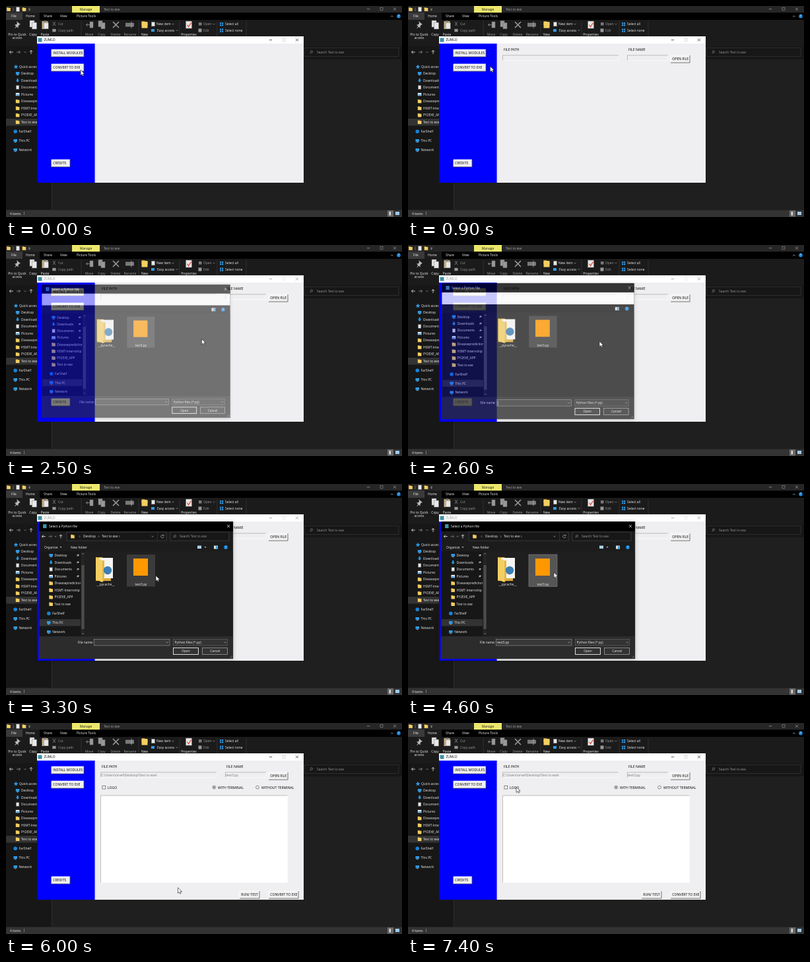
Animation, 600 px wide and 320 px high, one loop 8000 ms. Source, as an HTML page:

```html
<!DOCTYPE html>
<html lang="en">
<head>
<meta charset="utf-8">
<title>Convert a script</title>
<style>
html, body { margin: 0; width: 100%; height: 100%; overflow: hidden; background: #191919; }
svg { display: block; width: 600px; height: 320px; }
text { font: 4.9px "Open Sans", "Noto Sans", sans-serif; white-space: pre; }
.tk { font-size: 5.15px; }
#dialog { transform-origin: 197px 161px; filter: drop-shadow(0 1px 3px rgba(0,0,0,.2)); }
</style>
</head>
<body>
<svg id="stage" viewBox="0 0 600 320"></svg>
<script>
const DURATION = 8000, STEP = 100;
const YELLOW = '#f3cf62', BLUE = '#2f9be6', GREY = '#999', PALE = '#f0f0f0';

const rect = (x, y, w, h, fill, stroke = 'none', sw = .6) =>
  `<rect x="${x}" y="${y}" width="${w}" height="${h}" fill="${fill}" stroke="${stroke}" stroke-width="${sw}"/>`;
const text = (x, y, s, fill = PALE, anchor = 'start', cls = '') =>
  `<text x="${x}" y="${y}" fill="${fill}" text-anchor="${anchor}" class="${cls}">${s}</text>`;
const mid = (x, y, s, fill) => text(x, y, s, fill, 'middle');
const tk = (x, y, s, fill = '#000') => text(x, y, s, fill, 'start', 'tk');
const line = (d, stroke = PALE, sw = .7) =>
  `<path d="${d}" fill="none" stroke="${stroke}" stroke-width="${sw}"/>`;
const shape = (d, fill) => `<path d="${d}" fill="${fill}"/>`;
const circle = (x, y, r, fill, stroke = 'none') =>
  `<circle cx="${x}" cy="${y}" r="${r}" fill="${fill}" stroke="${stroke}" stroke-width=".6"/>`;
const group = (id, body) => `<g id="${id}">${body}</g>`;

const folder = (x, y, w = 5.6) =>
  rect(x - w / 2, y - 2.8, w * .55, 2, '#d9a93a') + rect(x - w / 2, y - 2, w, 4.8, YELLOW);
const page = (x, y, w = 5, h = 6.5, fill = '#e8e8e8') =>
  rect(x - w / 2, y - h / 2, w, h, fill, '#777', .5);
const chevron = (x, y, c = '#aaa') => line(`M${x - 1.5} ${y - .8}l1.5 1.5 1.5 -1.5`, c);
const next = (x, y) => line(`M${x - .7} ${y - 1.4}l1.4 1.4 -1.4 1.4`, '#bbb', .6);
const arrow = (x, y, turn, c = PALE) =>
  `<g transform="translate(${x} ${y}) rotate(${turn})">${line('M2.8 0H-2.6M-.4 -2.2L-2.6 0L-.4 2.2', c, .8)}</g>`;
const lens = (x, y) => circle(x, y - .6, 1.6, 'none', '#999') + line(`M${x - 1.2} ${y + .7}l-1.3 1.4`, '#999');
const help = (x, y) => circle(x, y, 2.9, '#1583d8') + mid(x, y + 1.7, '?', '#fff');

function windowButtons(x, y, c, box = c) {
  return line(`M${x - 2.2} ${y}h4.4`, c) + rect(x + 18, y - 2, 4, 4, 'none', box, .5) +
    line(`M${x + 38} ${y - 2}l4 4m0 -4l-4 4`, c);
}

const places = [['Desktop', 'screen'], ['Downloads', 'down'], ['Documents', 'page'], ['Pictures', 'picture'],
  ['Diseaseprediction', 'folder'], ['HSMT-Internship', 'folder'], ['PY2EXE_APP', 'folder'], ['Test to exe', 'folder']];
const roots = [['FarShelf', 'dot'], ['This PC', 'screen'], ['Network', 'screen']];
const icons = {
  screen: (x, y) => rect(x - 2.8, y - 2.3, 5.6, 3.8, BLUE) + rect(x - 1.5, y + 2, 3, .8, '#9ccff5'),
  down: (x, y) => shape(`M${x - 1.1} ${y - 2.8}h2.2v2.6h1.7l-2.8 3 -2.8 -3h1.7z`, BLUE),
  page: (x, y) => page(x, y, 4.4, 5.4),
  picture: (x, y) => rect(x - 2.8, y - 2.1, 5.6, 4.4, '#e8f2f8') + rect(x - 2.2, y, 4.4, 1.7, BLUE),
  folder: (x, y) => folder(x, y),
  dot: (x, y) => circle(x, y, 2.8, '#1683d8')
};

// Navigation list shared by the file manager and the open dialog.
function navList(x, y) {
  const row = ([name, icon], px, py) => icons[icon](px, py) + text(px + 5.4, py + 1.8, name);
  return places.map((p, i) => row(p, x, y + i * 10.55)).join('') +
    roots.map((p, i) => row(p, x - 3.4, y + 88 + i * 14)).join('');
}

function fileManager() {
  const big = (x, label, icon, c = PALE) => icon + mid(x, 44.5, label, c);
  const split = x => line(`M${x} 23V46`, '#444', .5);
  return rect(0, 0, 600, 320, '#1f1f1f') + rect(0, 0, 600, 10, '#272627') + rect(0, 10, 600, 11, '#000') +
    rect(0, 10, 25, 11, '#3a3a3a') + rect(25, 10, 26, 11, '#1b1b1b') + rect(0, 21, 600, 40, '#1b1b1b') +
    rect(0, 61, 600, 20, '#171717') +
    folder(4, 5) + line('M11 2.5v5.5', '#aaa', .5) + page(18, 5) + folder(27.5, 5) + line('M34 4h3', '#ccc', .5) +
    shape('M34 5.5h3l-1.5 1.6z', '#ccc') +
    rect(100, 0, 42, 10, '#ece76c') + mid(121, 6.8, 'Manage', '#222') + text(148, 6.8, 'Test to exe', '#aaa') +
    windowButtons(549, 4.7, '#aaa') +
    [[8, 'File'], [30, 'Home'], [57, 'Share'], [82, 'View'], [107, 'Picture Tools']].map(([x, s]) => text(x, 17.4, s)).join('') +
    line('M583 16.5l1.8 -1.7 1.8 1.7', '#ccc') + help(595, 15.5) +
    big(17, 'Pin to Quick', shape('M16 23l6 5 -2 .5 -1.5 2 0 3 -2.2 -2 -3.3 3 2.2 -4 -2.2 -2 3 -.5 1 -2z', '#bbb')) + mid(17, 50.3, 'access') +
    big(41, 'Copy', page(39.5, 27, 7, 10) + page(43, 30, 7, 10)) +
    big(59, 'Paste', rect(54.5, 23, 9, 12, '#c9b083') + rect(57, 22.3, 4, 2, '#777') + page(60.7, 30, 7, 9.5)) +
    line('M71 24l4 6m0 -6l-4 6', GREY) + text(79, 29.3, 'Cut', GREY) + page(73, 37, 5, 4, GREY) + text(79, 38.8, 'Copy path', GREY) +
    split(114) + big(126, 'Move', arrow(124, 28.5, 0, GREY) + page(129.5, 28.5, 5, 9, GREY), GREY) +
    big(145, 'Copy', page(143, 27, 6, 9, GREY) + page(147, 30, 6, 9, GREY), GREY) +
    big(166, 'Delete', line('M162 24l9 9m0 -9l-9 9', GREY, 1.6), GREY) +
    big(188, 'Rename', rect(181.5, 26, 12, 5, '#777', GREY) + line('M190 23.5v10', '#bbb'), GREY) + split(201) +
    big(210, 'New', folder(210, 26, 9) + rect(205.5, 26, 9, 7.5, YELLOW)) +
    page(223, 27.5) + text(228, 29.3, 'New item') + chevron(253, 27.5) +
    rect(220, 35, 5, 4, BLUE) + text(229, 38.8, 'Easy access') + chevron(259, 37) + split(263) +
    big(277, 'Properties', page(277, 28.5, 9, 11) + line('M274.5 28.5l2 3 4 -6', '#e54b32', 1.3)) +
    rect(292, 25, 4.5, 4.5, '#777') + text(299, 29.3, 'Open', GREY) + chevron(315, 27.5, GREY) +
    page(294, 37, 4.5, 5, GREY) + text(299, 38.8, 'Edit', GREY) + split(320) +
    [27.5, 37].map(y => rect(324, y - 2.5, 2.2, 2.2, BLUE) + rect(327, y - 2.5, 2.2, 2.2, BLUE) +
      rect(324, y + .5, 2.2, 2.2, BLUE) + rect(327, y + .5, 2.2, 2.2, BLUE)).join('') +
    text(332, 29.3, 'Select all') + text(332, 38.8, 'Select none') + split(364) +
    arrow(8, 70, 0) + arrow(19, 70, 180, GREY) + chevron(29, 70) + arrow(38, 70, 90) +
    rect(452, 63.5, 143, 13, '#171717', '#444', .5) + lens(463, 70) + text(471, 71.8, 'Search Test to exe', GREY) +
    rect(0, 81, 69, 228, '#171717') + line('M69.3 81V309', '#3a3a3a', .6) + rect(0, 171, 69, 10.5, '#333') +
    shape('M15 88.5l1 2.4 2.4 .2 -1.8 1.6 .6 2.5 -2.2 -1.4 -2.2 1.4 .6 -2.5 -1.8 -1.6 2.4 -.2z', BLUE) +
    text(20, 93.8, 'Quick access') + navList(17.6, 102.3) +
    rect(0, 309.5, 600, 10.5, '#333') + text(6, 316.7, '4 items') + line('M27.5 312v5', '#bbb', .5) +
    rect(578, 310, 9, 9.5, '#6a6a6a') + rect(580.8, 312, 2, 5.5, '#eee') + rect(590, 312, 6, 5, '#9cc9e8');
}

function button(id, x, y, w, label) {
  return group(id, rect(x, y, w, 11, '#f0f0f0') + line(`M${x} ${y + 11}V${y}H${x + w}`, '#fff', .8) +
    line(`M${x} ${y + 11}H${x + w}V${y}`, '#555', .8) + tk(x + 2.3, y + 7.2, label));
}

const sunken = (x, y, w, h, fill) => rect(x, y, w, h, fill) +
  line(`M${x} ${y + h}V${y}H${x + w}`, '#999', .6) + line(`M${x} ${y + h}H${x + w}V${y}`, '#fff', .6);

function appWindow() {
  const radio = (x, on) => circle(x, 97.5, 2.4, '#fff', '#333') + (on ? circle(x, 97.5, 1.1, '#222') : '');
  return rect(47, 46, 404, 222, '#efeef0') + rect(47, 46, 404, 11, '#fff') +
    rect(48.5, 48.5, 6, 6, '#3f91a5') + `<text id="title" x="57.5" y="53.4">ZUMLO</text>` +
    group('controls', windowButtons(401, 51.5, '#222', '#bbb')) +
    rect(47, 57, 87.6, 211, '#00f') +
    button('install', 69, 66, 49, 'INSTALL MODULES') + button('convert', 69, 88, 49, 'CONVERT TO EXE') +
    button('credits', 69, 233, 28, 'CREDITS') +
    group('fileForm', tk(145, 68.2, 'FILE PATH') + tk(334, 68.2, 'FILE NAME') +
      sunken(143.5, 74.8, 175.5, 8, '#efeef0') + sunken(332.5, 74.8, 61.5, 8, '#efeef0') + button('openFile', 398, 75, 29, 'OPEN FILE')) +
    group('options', tk(144, 80.7, 'C:\\Users\\orvel\\Desktop\\Test to exe\\', '#777') + tk(333, 80.7, 'test3.py', '#777') +
      rect(146, 95.2, 4.8, 4.8, '#fff', '#333') + tk(154, 99.7, 'LOGO') +
      radio(315.3, true) + tk(321, 99.7, 'WITH TERMINAL') + radio(381, false) + tk(387, 99.7, 'WITHOUT TERMINAL') +
      sunken(143.5, 110, 283, 132, '#fff') + button('run', 354, 255, 30, 'RUN/ TEST') + button('build', 398, 255, 45, 'CONVERT TO EXE'));
}

function dialog() {
  const pin = y => shape(`M109 ${y - 2}l2.3 1.8 -1.3 .3 -.3 1.3 -1.2 -1 -1.6 1.8 1 -2.2 -.8 -.8 1.5 -.2z`, '#bbb');
  return rect(50, 57, 294, 208, '#1c1c1c', '#555', .4) + rect(50, 57, 294, 14.5, '#000') +
    rect(56, 61, 5.5, 6, '#3f91a5') + text(65, 66, 'Select a Python file', '#fff') + line('M335 62l4 4m0 -4l-4 4', '#eee') +
    group('loading', rect(50, 71, 294, 18.3, '#fff')) +
    group('loaded', arrow(57, 79.5, 0) + arrow(67, 79.5, 180, '#777') + chevron(75, 79.5) + arrow(83, 79.5, 90) +
      rect(92, 73, 151, 13, '#171717', '#555', .5) + folder(101, 79.5) + next(111.5, 79.5) + text(117, 81.3, 'Desktop') +
      next(140.5, 79.5) + text(145, 81.3, 'Test to exe') + next(171.5, 79.5) + chevron(222, 79.5) + line('M229.5 73v13', '#444', .5) +
      line('M238.4 78a2.2 2.2 0 1 0 .6 2M239 76.5v2h-2', '#bbb', .6) +
      rect(249, 73, 89, 13, '#171717', '#555', .5) + lens(256, 79.5) + text(263, 81.3, 'Search Test to exe', GREY) +
      text(58, 97.8, 'Organize') + shape('M81.5 95h3l-1.5 1.7z', '#ccc') + text(98, 97.8, 'New folder') +
      rect(290, 93.5, 6, 4.5, '#a9d2ec') + shape('M300.5 95h3l-1.5 1.7z', '#ccc')) +
    rect(315, 93.5, 6, 5, '#ddd') + rect(318, 94.3, 2.5, 3.7, BLUE) + help(333, 96) +
    rect(50.3, 102, 69.7, 129, '#171717') + rect(120, 102, 223.7, 129, '#1f1f1f') + rect(51, 205, 62, 10.5, '#333') +
    `<g clip-path="url(#navClip)">${navList(68.2, 108.3)}</g>` + [108.3, 118.9, 129.4, 140].map(pin).join('') +
    rect(113.5, 103, 6, 127, '#242424') + rect(114.3, 123, 4.4, 97, '#4b4b4b') + chevron(116.5, 227) +
    line('M115 106.5l1.5 -1.5 1.5 1.5', '#aaa') +
    shape('M136 111h10l3 3h10v33h-23z', '#d9a93a') + shape('M141 112h21v31h-21z', '#f5f5f2') +
    shape('M136 111l10 5v33l-10 -4z', YELLOW) + shape('M146 116h3v30l-3 3z', '#e3b84a') + circle(154, 131, 6.2, '#3d7eb2') +
    mid(151, 154, '__pycache__') +
    `<rect id="tile" x="183" y="107" width="43" height="48.5" stroke-width=".6"/>` +
    rect(193, 113, 22, 26, '#ff9800') + mid(204.5, 154, 'test3.py') +
    rect(50.3, 231, 293.4, 33.7, '#2c2c2c') + text(132, 242.2, 'File name:', PALE, 'end') +
    rect(133.5, 235.5, 114.5, 9.5, '#383838', '#aaa', .5) + chevron(244, 240.3) +
    rect(253.5, 235.5, 82, 9.5, '#333', '#777', .5) + text(255.5, 242.2, 'Python files (*.py)') + chevron(332, 240.3) +
    group('highlight', rect(134.7, 236.6, 20, 7.2, '#0078d7')) + group('fileName', text(135, 242.2, 'test3.py', '#fff')) +
    group('caret', line('M135.6 237v7', '#fff', .6)) +
    `<rect id="openButton" x="253.5" y="248.5" width="38" height="10" stroke="#eee" stroke-width=".9"/>` + mid(272.5, 255.4, 'Open') +
    rect(297.5, 248.5, 38, 10, '#333', '#aaa', .7) + mid(316.7, 255.4, 'Cancel') +
    line('M339 264l4 -4m-2 4l2 -2', '#888', .6);
}

const stage = document.getElementById('stage');
stage.innerHTML = '<clipPath id="navClip"><rect x="50" y="103" width="63.3" height="128"/></clipPath>' +
  fileManager() + appWindow() + group('dialog', dialog()) +
  '<path id="cursor" d="M0 0V8.4L2 6.6L3.3 9.3L4.8 8.6L3.5 6H6.2Z" fill="#fff" stroke="#111" stroke-width=".6"/>';
const el = Object.fromEntries([...stage.querySelectorAll('[id]')].map(e => [e.id, e]));

// time, x, y
const pointer = [[0, 113, 97], [400, 108, 92], [800, 108, 92], [1500, 405, 83], [1900, 405, 83], [2600, 290, 146],
  [3300, 227, 139], [3700, 221, 134], [4600, 221, 134], [5100, 263, 255], [5900, 263, 255], [6800, 187, 101],
  [6900, 187, 101], [7400, 164, 97], [DURATION, 164, 97]];
// time, opacity, scale
const fade = [[0, 0, .95], [2400, .3, .95], [2500, .6, .97], [2600, .78, .99], [2700, 1, 1],
  [5400, .55, .98], [5500, .17, .96], [5600, 0, .95]];

function pointerAt(t) {
  const i = pointer.findIndex(k => k[0] > t);
  const [t0, x0, y0] = pointer[i - 1], [t1, x1, y1] = pointer[i];
  const p = (t - t0) / (t1 - t0), e = p * p * (3 - 2 * p);
  return [x0 + (x1 - x0) * e, y0 + (y1 - y0) * e];
}

const show = (id, on) => { el[id].style.display = on ? '' : 'none'; };

function draw(t) {
  const within = (a, b) => t >= a && t < b;
  const press = (id, on) => el[id].setAttribute('transform', on ? 'translate(.5 .5)' : '');
  const [x, y] = pointerAt(t);
  el.cursor.setAttribute('transform', `translate(${x} ${y})`);

  const inactive = within(2300, 5500);
  el.title.setAttribute('fill', inactive ? '#999' : '#000');
  el.controls.setAttribute('opacity', inactive ? .5 : 1);
  press('convert', within(700, 900));
  press('openFile', within(1700, 1900));
  show('fileForm', t >= 900);
  show('options', t >= 5700);

  const [, opacity, scale] = fade.filter(k => k[0] <= t).pop();
  show('dialog', opacity > 0);
  el.dialog.style.opacity = opacity;
  el.dialog.style.transform = `scale(${scale})`;
  show('loading', t < 2700);
  show('loaded', t >= 2700);

  const chosen = t >= 4400;
  el.tile.setAttribute('fill', chosen ? '#555' : '#3b3b3b');
  el.tile.setAttribute('stroke', chosen ? '#888' : 'none');
  show('fileName', chosen);
  show('highlight', t >= 5100);
  show('caret', within(2600, 3100) || within(3700, 4200));
  el.openButton.setAttribute('fill', t >= 5000 ? '#555' : '#333');
}

function tick(now) {
  draw(Math.floor(now % DURATION / STEP) * STEP);
  requestAnimationFrame(tick);
}
draw(0);
requestAnimationFrame(tick);
</script>
</body>
</html>
```
